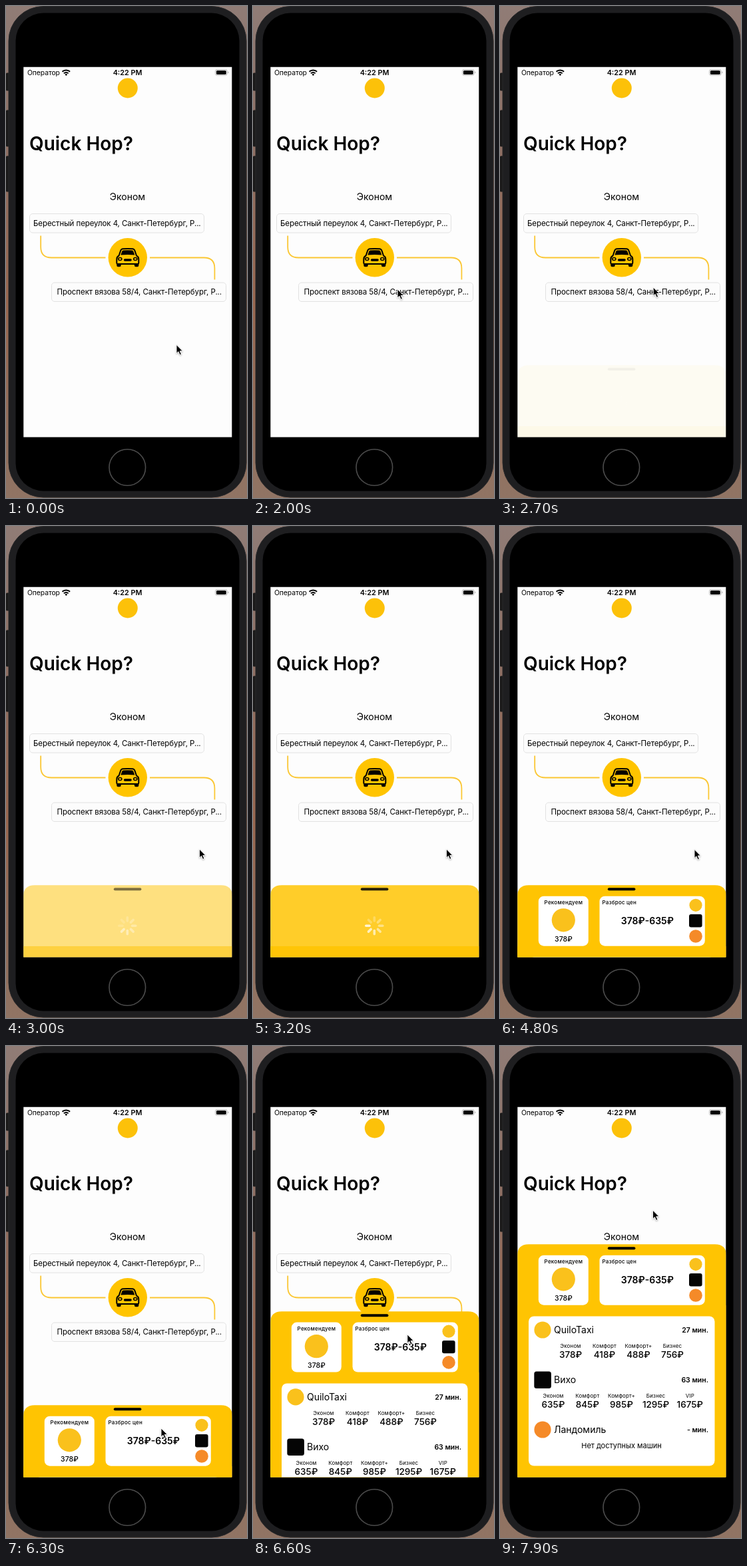
An HTML page that plays this animation: 362 px wide and 740 px high, repeating every 8000 ms.

```html
<!DOCTYPE html>
<html lang="ru">
<head>
<meta charset="utf-8">
<title>Taxi prices</title>
<style>
html, body { margin: 0; width: 100%; height: 100%; overflow: hidden; background: #8b6a5f; }
svg { display: block; width: 362px; height: 740px; }
text { font-family: Inter, Roboto, sans-serif; fill: #000; white-space: pre; }
</style>
</head>
<body>
<svg viewBox="0 0 362 740">
  <defs>
    <linearGradient id="wall" x2="0" y2="1">
      <stop offset="0" stop-color="#907c76"/>
      <stop offset=".3" stop-color="#8f7064"/>
      <stop offset=".6" stop-color="#9a6850"/>
      <stop offset="1" stop-color="#907464"/>
    </linearGradient>
    <clipPath id="screen"><rect x="26.3" y="91.7" width="313" height="556.8"/></clipPath>
    <filter id="soft" x="-50%" y="-50%" width="200%" height="200%">
      <feDropShadow dx="0" dy="1" stdDeviation="1" flood-opacity=".35"/>
    </filter>
  </defs>

  <rect width="362" height="740" fill="url(#wall)"/>
  <g fill="#1b1a1a">
    <rect x="0" y="100.5" width="7" height="27" rx="1.5"/>
    <rect x="0" y="156.5" width="7" height="55" rx="1.5"/>
    <rect x="0" y="225.5" width="7" height="54" rx="1.5"/>
  </g>
  <rect x="4" y=".5" width="357" height="738.5" rx="52" fill="#1e1e20" stroke="#29292b"/>
  <rect x="14.5" y="10.5" width="336" height="719" rx="42" fill="#000"/>
  <circle cx="182.3" cy="694" r="27.3" fill="#000" stroke="#4b4b4b" stroke-width="1.6"/>

  <g clip-path="url(#screen)">
    <rect x="26" y="91" width="314" height="558" fill="#fdfdfd"/>
    <g id="page"></g>

    <g fill="none" stroke="#000" stroke-width="2">
      <path d="M84.5 98.8a8.2 8.2 0 0 1 11.6 0"/>
      <path d="M86.9 101.4a4.8 4.8 0 0 1 6.8 0"/>
    </g>
    <path d="M88.4 103a2.8 2.8 0 0 1 3.8 0l-1.9 2z"/>
    <rect x="314.5" y="95.5" width="17.6" height="8.8" rx="2.6" fill="none" stroke="#b4b4b4" stroke-width=".9"/>
    <rect x="315.9" y="96.9" width="14.8" height="6" rx="1.5"/>
    <path d="M333.4 98.2v3.2q1.1-.5 1.1-1.6t-1.1-1.6z" fill="#aaa"/>

    <circle cx="182.8" cy="123.5" r="15" fill="#fcc109"/>

    <g fill="none" stroke="#fbc733" stroke-width="1.8">
      <path d="M52.2 345.5v17q0 16 16 16H149.5"/>
      <path d="M216 378.5h81.400q16 0 16 16v17"/>
    </g>
    <circle cx="182.8" cy="378.3" r="29.2" fill="#ffc400"/>
    <g stroke="#000" stroke-linejoin="round">
      <path d="M166.300 387h6.400v3.200q0 2-2 2h-2.400q-2 0-2-2zM192.900 387h6.400v3.200q0 2-2 2h-2.400q-2 0-2-2z" stroke="none"/>
      <path d="M169.600 375.500l2.600-7.600q.9-2.400 3.400-2.600q7.200-.6 14.400 0q2.500.2 3.400 2.600l2.600 7.600q3.300 1.700 3.300 5.300v5.700q0 1.400-1.400 1.400h-30.200q-1.400 0-1.400-1.400v-5.700q0-3.600 3.300-5.300z" fill="#ffc400" stroke-width="2"/>
      <path d="M172.300 374.600l2-5.700q.4-1.300 1.800-1.400q6.700-.5 13.400 0q1.400.1 1.800 1.400l2 5.700q-10.500-1-21 0z" stroke="none"/>
      <g fill="none" stroke-width="1.500">
        <ellipse cx="171.300" cy="380.600" rx="2.600" ry="2"/>
        <ellipse cx="194.300" cy="380.600" rx="2.600" ry="2"/>
      </g>
      <rect x="176.800" y="380.300" width="12" height="3.500" rx="1.700" stroke="none"/>
    </g>

    <g id="sheet">
      <path d="M26 660V557.300q0-17 17-17H323q17 0 17 17V1000H26z" fill="#ffc402"/>
      <rect x="26" y="632" width="314" height="400" fill="#ffc402"/>
      <rect x="161.800" y="544.300" width="41.600" height="4" rx="2"/>
      <g id="spin"></g>
      <g id="cards"></g>
    </g>
  </g>

  <g id="arrow" filter="url(#soft)">
    <path transform="scale(.92)" d="M0 0V14.200L3.200 11.200L5.600 16.600L8.100 15.500L5.700 10.300H10.200Z" stroke="#fff"/>
  </g>
</svg>
<script>
const $ = id => document.getElementById(id);
const YELLOW = '#fac11c', ORANGE = '#f58a28';

const text = (x, y, size, str, o = {}) =>
  `<text x="${x}" y="${y}" font-size="${size}" font-weight="${o.w || 400}" ` +
  `text-anchor="${o.a || 'start'}" letter-spacing="${o.ls || 0}">${str}</text>`;
const box = (x, y, w, h, r, fill, extra = '') =>
  `<rect x="${x}" y="${y}" width="${w}" height="${h}" rx="${r}" fill="${fill}" ${extra}/>`;
const dot = (x, y, r, fill) => `<circle cx="${x}" cy="${y}" r="${r}" fill="${fill}"/>`;
const mid = { a: 'middle' };

const field = (x, y, tx, str) =>
  box(x, y, 262, 28.5, 4.5, '#fcfcfc', 'stroke="#e2e2e2"') + text(tx, y + 18.3, 11.5, str, { ls: -.08 });

$('page').innerHTML =
  text(32, 104, 10.4, 'Оператор', { ls: -.1 }) +
  text(182.5, 104, 10.8, '4:22 PM', { a: 'middle', w: 600 }) +
  text(35, 216.5, 28, 'Quick Hop?', { w: 600 }) +
  text(182.5, 292, 14, 'Эконом', mid) +
  field(35.5, 312.5, 41, 'Берестный переулок 4, Санкт-Петербург, Р...') +
  field(68.5, 416, 76.6, 'Проспект вязова 58/4, Санкт-Петербург, Р...');

// Layout inside the sheet is given for its collapsed place, top at 540.
const prices = (y, xs, list) => xs.map((x, i) =>
  text(x, y, 8, list[i][0], { a: 'middle', ls: .15 }) +
  text(x, y + 15.3, 13.5, list[i][1] + '₽', { a: 'middle', w: 500 })).join('');
const head = (y, name, wait) =>
  text(81, y + 5, 14, name) + text(313, y + 4, 10.5, wait + ' мин.', { a: 'end', w: 600 });

$('cards').innerHTML =
  box(57.8, 556.7, 75, 75, 8, '#fff') +
  text(95.4, 568.8, 8, 'Рекомендуем', { a: 'middle', w: 500, ls: .25 }) +
  dot(95.3, 592.8, 17.6, YELLOW) +
  text(95.4, 624.6, 10.5, '378₽', { a: 'middle', w: 500 }) +
  box(149.5, 556.7, 158.3, 75, 8, '#fff') +
  text(153.5, 568.8, 8, 'Разброс цен', { w: 500, ls: .2 }) +
  text(221.3, 599.2, 14, '378₽-635₽', { a: 'middle', w: 600 }) +
  dot(294, 570.3, 9.6, YELLOW) +
  box(284, 584, 19.6, 19.4, 3, '#050505') +
  dot(294, 617, 9.8, ORANGE) +
  box(43, 648.5, 279.5, 225, 8, '#fff') +
  dot(64, 669, 12.6, YELLOW) + head(669, 'QuiloTaxi', '27') +
  prices(695.8, [106, 157, 208, 259],
    [['Эконом', 378], ['Комфорт', 418], ['Комфорт+', 488], ['Бизнес', 756]]) +
  box(51.3, 731.5, 25.6, 25.6, 3.5, '#050505') + head(744.3, 'Вихо', '63') +
  prices(770.8, [80, 131.3, 182.5, 234, 285.3],
    [['Эконом', 635], ['Комфорт', 845], ['Комфорт+', 985], ['Бизнес', 1295], ['VIP', 1675]]) +
  dot(64, 819, 12.6, ORANGE) + head(819, 'Ландомиль', '-') +
  text(182.5, 847, 11, 'Нет доступных машин', mid);

const SPOKES = 8;
$('spin').innerHTML = Array.from({ length: SPOKES }, (_, i) =>
  `<path d="M7.3 0H12.5" stroke="#fff" stroke-width="3.6" stroke-linecap="round" ` +
  `transform="translate(182.3 601.3) rotate(${i * 360 / SPOKES})"/>`).join('');
const spokes = [...$('spin').children];

// time, x, y of the pointer tip
const path = [
  [0, 256, 509.5], [1500, 256, 509.5], [2000, 217, 426], [2300, 187, 378], [2500, 187, 378],
  [2950, 290.5, 486], [3300, 290.5, 486], [3500, 292, 487.5], [4800, 292, 486.5],
  [5000, 307, 470], [5400, 307, 470], [6100, 233, 575], [6350, 233, 575],
  [6800, 231, 333], [6950, 231, 333], [7700, 229.5, 247], [8000, 229.5, 247]
];

const ramp = (t, a, b) => {
  const k = Math.min(1, Math.max(0, (t - a) / (b - a)));
  return k * k * (3 - 2 * k);
};
const place = t => {
  const i = path.findIndex((p, n) => n && t <= p[0]);
  const [a, ax, ay] = path[i - 1], [b, bx, by] = path[i];
  // one continuous sweep up to the car
  const k = a === 1500 || a === 2000 ? (t - a) / (b - a) : ramp(t, a, b);
  return [ax + (bx - ax) * k, ay + (by - ay) * k];
};

const LOOP = 8000, STEP = 100;
function draw(t) {
  const [x, y] = place(t);
  $('arrow').setAttribute('transform', `translate(${x} ${y})`);

  const shown = ramp(t, 2600, 3400);
  const lift = -242 * ramp(t, 6350, 6800);
  $('sheet').setAttribute('transform', `translate(0 ${lift})`);
  for (const el of $('sheet').children) el.setAttribute('opacity', shown);

  const ready = ramp(t, 3900, 4300);
  $('cards').setAttribute('opacity', ready);
  $('spin').setAttribute('opacity', shown * (1 - ready));
  const lead = Math.floor((t - 3600) / 125);
  spokes.forEach((s, i) => {
    const age = (((lead - i) % SPOKES) + SPOKES) % SPOKES;
    s.setAttribute('opacity', Math.max(.3, .95 - age * .11));
  });
}

const start = performance.now();
function tick() {
  const t = (performance.now() - start) % LOOP;
  draw(Math.floor(t / STEP) * STEP);
  requestAnimationFrame(tick);
}
draw(0);
requestAnimationFrame(tick);
</script>
</body>
</html>
```
